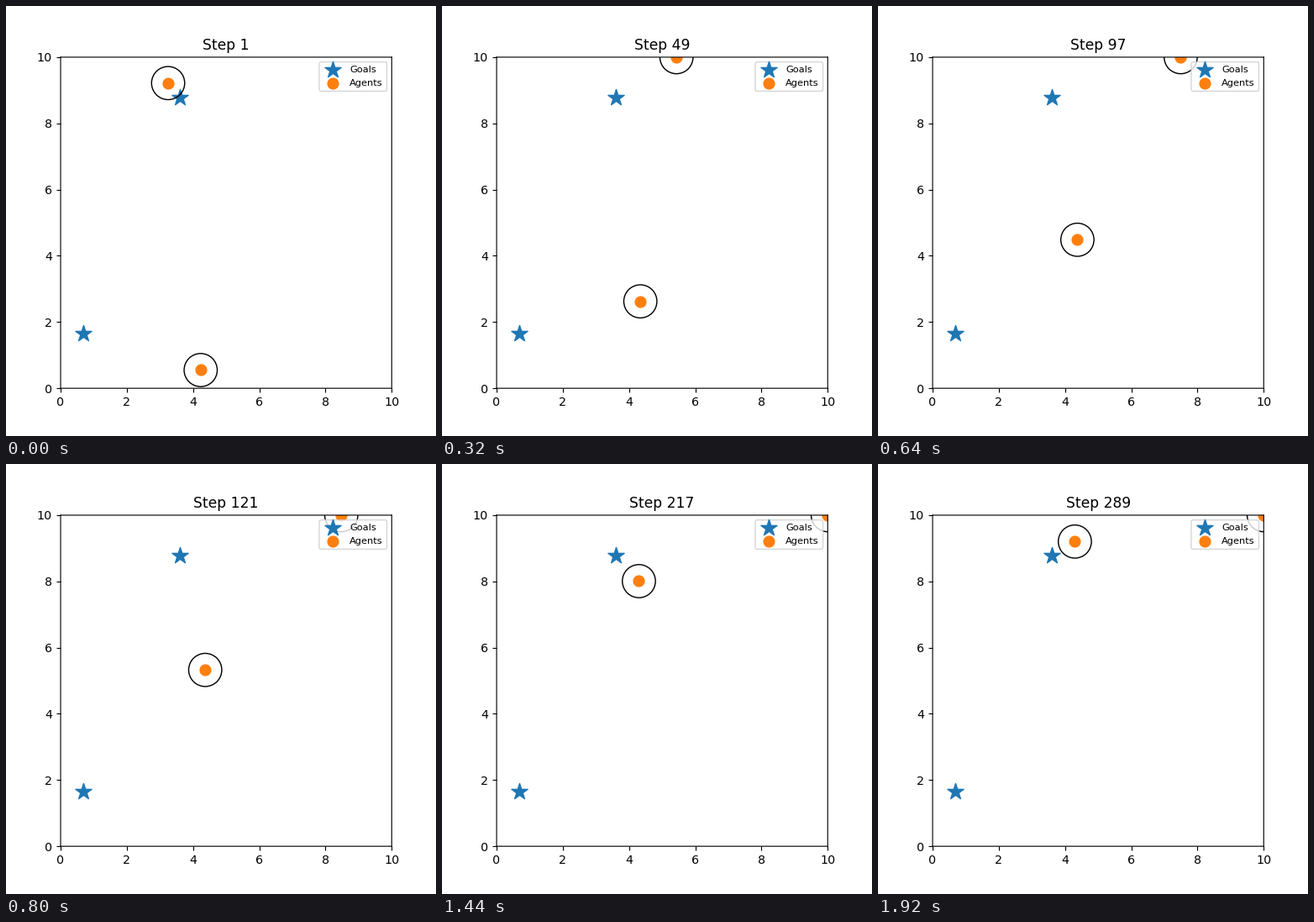
Write a matplotlib script that moves like this. It is 512 px wide and 512 px high and loops after 2000 ms.

```python
import numpy as np
import matplotlib.pyplot as plt
from matplotlib.animation import FuncAnimation

FRAMES, INTERVAL, STRIDE = 25, 80, 12
SIZE, RADIUS = 10, 0.5

# Unsnapped paths give soft, sub-pixel line positions
plt.rcParams["path.snap"] = False


def slider(i):
    """Runs up to the top wall, then slows along it into the corner."""
    return 3.247 + 0.562 * i - 0.0039 * i**2, 9.217 + 0.3 * i


def riser(i):
    """Climbs with falling speed, swaying a little to the right and back."""
    x = 4.23 + 0.0404 * i - 0.00344 * i**2 + 0.000078 * i**3
    y = 0.55 + 0.5432 * i - 0.00581 * i**2 - 0.000075 * i**3
    return x, y


def agents(i):
    return np.clip([slider(i), riser(i)], 0, SIZE)


fig, ax = plt.subplots(figsize=(5, 5), dpi=102.4)
fig.subplots_adjust(left=0.1245, right=0.8995, bottom=0.111, top=0.881)
ax.set(xlim=(0, SIZE), ylim=(0, SIZE), aspect="equal")
ax.scatter([3.6, 0.69], [8.79, 1.665], s=200, marker="*", label="Goals")
dots = ax.scatter(*agents(0).T, s=80, label="Agents")
rings = [ax.add_patch(plt.Circle(p, RADIUS, fill=False)) for p in agents(0)]
title = ax.set_title("Step 1")
ax.legend(loc="upper right", fontsize=8)


def update(i):
    pos = agents(i)
    dots.set_offsets(pos)
    for ring, p in zip(rings, pos):
        ring.center = p
    title.set_text(f"Step {1 + STRIDE * i}")
    return dots, *rings, title


anim = FuncAnimation(fig, update, frames=FRAMES, interval=INTERVAL,
                     repeat=True, repeat_delay=0, blit=False)
plt.show()
```
